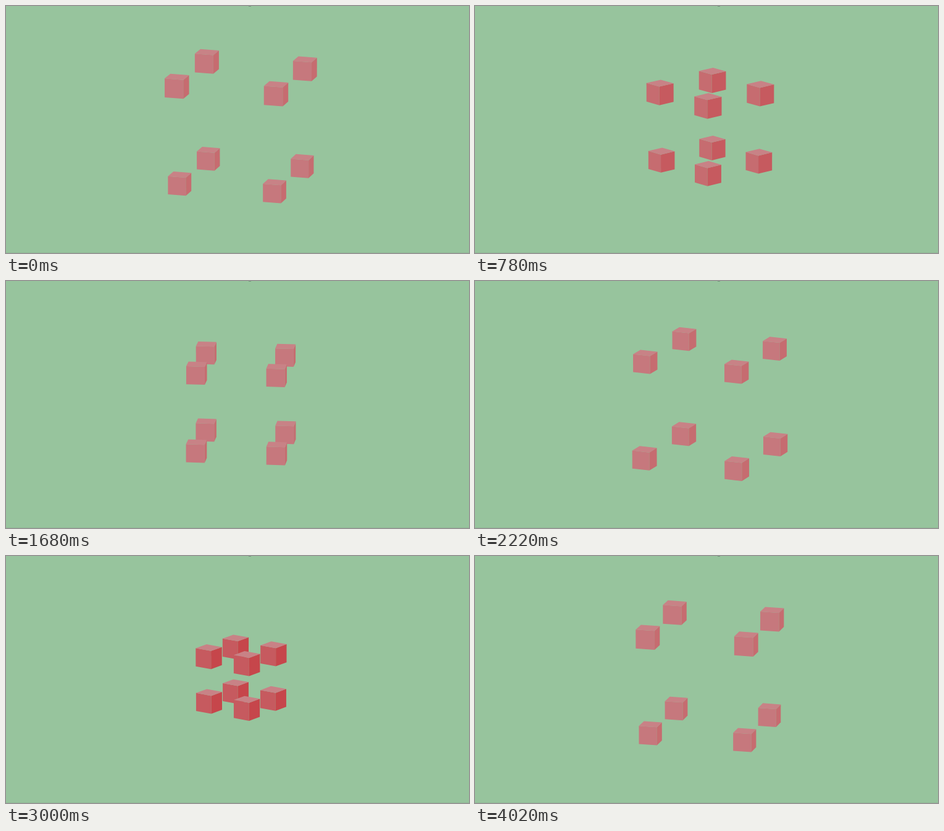
An HTML page with a canvas for the animation above (4080 ms loop, 750x400 px).

```html
<!DOCTYPE html>
<html lang="en">
<head>
<meta charset="utf-8">
<title>Eight turning cubes</title>
<style>
  html, body { margin: 0; width: 100%; height: 100%; overflow: hidden; background: #97c49d; }
  canvas { display: block; }
</style>
</head>
<body>
<canvas id="stage" width="750" height="400"></canvas>
<script>
const ctx = document.getElementById('stage').getContext('2d');
const STEP = 60, COUNT = 68, PULSE = COUNT / 2;
const CX = 381, SIZE = 30.2, DEPTH = 0.00008;
const TILT = 15 * Math.PI / 180, SIN = Math.sin(TILT), COS = Math.cos(TILT);
const TOP = '#c88286';
// Side faces in turning order: front, right, back, left.
const SIDES = ['#c6787d', '#c66c70', '#c65a5f', '#c6464b'];

// One full turn per pulse, each an S-curve that blends into the next.
function turnAt(f) {
  let turns = 0;
  for (let i = -1; i <= 2; i++) {
    turns += 1 / (1 + Math.exp(-0.295 * (f - 15.2 - i * PULSE)));
  }
  return (14 + 360 * (turns - 1)) * Math.PI / 180;
}

// Distance between cube centres: widest at step 2.5, closed half a pulse later.
function gapAt(f) {
  const half = PULSE / 2;
  const x = Math.abs((f - 2.5 + half + PULSE) % PULSE - half) / half;
  return 162 - 145 * x ** 2.2;
}

// Scale of the upper layer against the lower one.
const liftAt = f => 1.014 + 0.028 * Math.cos((f - 2) / COUNT * 2 * Math.PI);

function fill(points, colour) {
  ctx.beginPath();
  points.forEach(p => ctx.lineTo(...p));
  ctx.closePath();
  ctx.fillStyle = colour;
  ctx.fill();
}

function seam(a, b) {
  ctx.beginPath();
  ctx.moveTo(...a);
  ctx.lineTo(...b);
  ctx.strokeStyle = 'rgba(205,140,140,0.5)';
  ctx.lineWidth = 0.7;
  ctx.stroke();
}

function draw(f) {
  const turn = turnAt(f), gap = gapAt(f), lift = liftAt(f);
  const c = Math.cos(turn), s = Math.sin(turn);
  const cy = 196.3 + (1.042 - lift) * 22;

  const near = (x, y, z) => (x * s + z * c) * COS + y * SIN;
  const project = (x, y, z) => {
    const p = 1 + DEPTH * near(x, y, z);
    return [CX + (x * c - z * s) * p, cy + ((x * s + z * c) * SIN - y * COS) * p];
  };

  ctx.fillStyle = '#97c49d';
  ctx.fillRect(0, 0, 750, 400);
  ctx.fillStyle = '#91b896';
  ctx.fillRect(0, 399, 750, 1);
  ctx.fillStyle = '#71937a';
  ctx.fillRect(393, 0, 4, 1);

  const cubes = [];
  for (const y of [-1, 1]) for (const x of [-1, 1]) for (const z of [-1, 1]) {
    const k = y > 0 ? lift : 1, d = gap * k / 2;
    cubes.push({ x: x * d, y: y * d, z: z * d, r: SIZE * k / 2 });
  }
  cubes.sort((a, b) => near(a.x, a.y, a.z) - near(b.x, b.y, b.z));

  const facing = [c, s, -c, -s];
  // Ground corners, each side running from corner i to i + 1.
  const corners = [[-1, 1], [1, 1], [1, -1], [-1, -1]];
  for (const { x, y, z, r } of cubes) {
    const ring = h => corners.map(([i, j]) => project(x + i * r, y + h * r, z + j * r));
    const high = ring(1), low = ring(-1);
    SIDES.forEach((colour, i) => {
      const j = (i + 1) % 4;
      if (facing[i] > 0) fill([high[i], high[j], low[j], low[i]], colour);
    });
    fill(high, TOP);
  }

  // Joints on the dark side while the cubes are pressed together.
  if (gap < SIZE && s < 0) {
    const edge = (gap + SIZE) / 2, joint = (SIZE - gap) / 2;
    const y = -joint * lift;
    seam(project(-edge, y, -edge), project(-edge, y, edge));
    seam(project(-edge, y, joint), project(-edge, -edge, joint));
  }
}

const start = performance.now();
function tick() {
  const t = Math.max(0, performance.now() - start);
  draw(Math.floor(t / STEP) % COUNT);
  requestAnimationFrame(tick);
}
tick();
</script>
</body>
</html>
```
